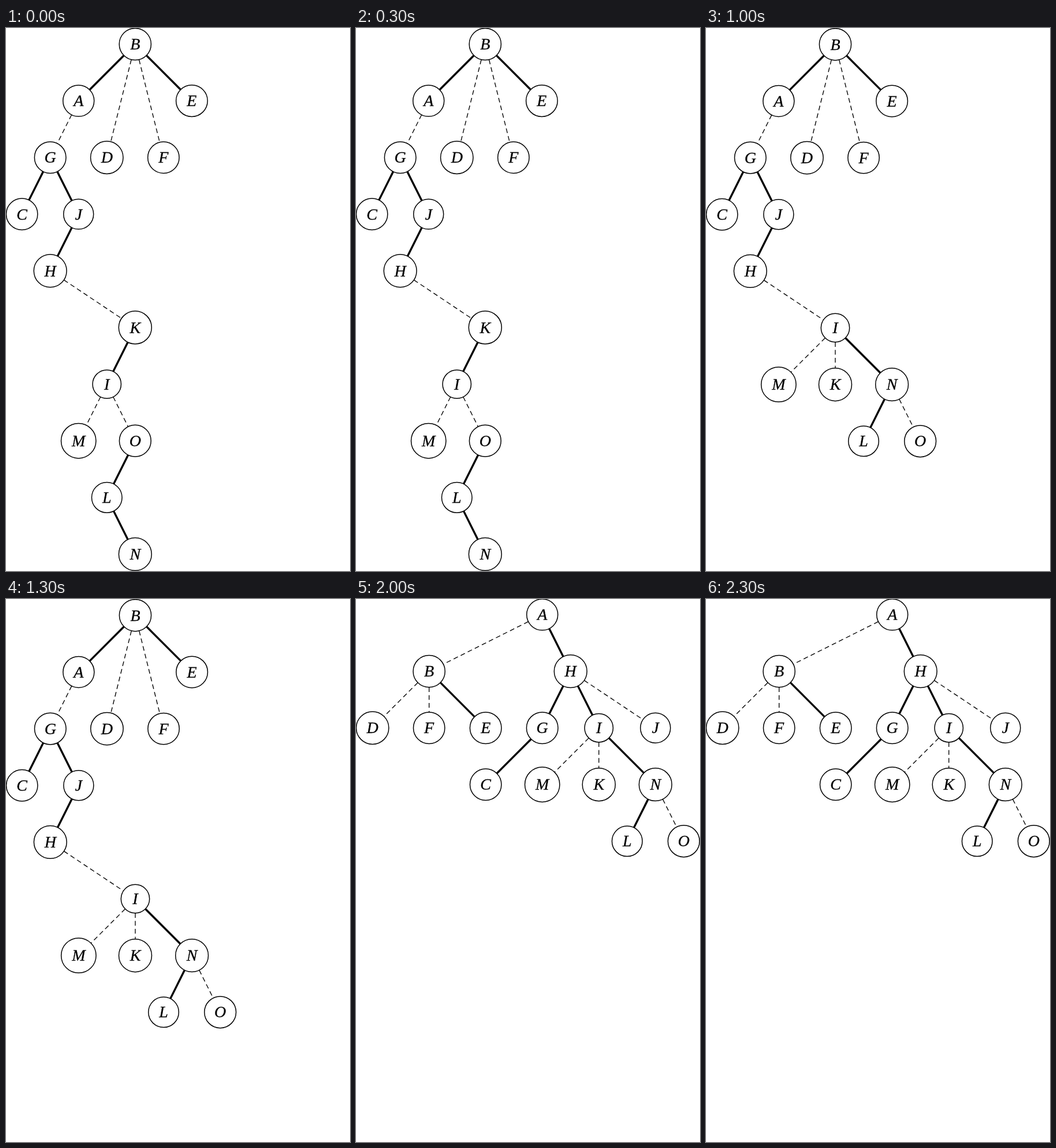
Animation of 596 by 940 pixels, one loop 2.5 s. Source, as an HTML page:

```html
<!DOCTYPE html>
<html lang="en">
<head>
<meta charset="utf-8">
<title>Tree restructuring</title>
<style>
  html, body { margin: 0; width: 100%; height: 100%; overflow: hidden; background: #fff; }
  svg { display: block; width: 596px; height: 940px; }
  .step { opacity: 0; animation: show 2.5s step-end infinite; }
  @keyframes show { 0% { opacity: 1; } 20%, 100% { opacity: 0; } }
  .step { color: #000; }
  .hot { color: #f00; }
  circle { fill: none; stroke: currentColor; stroke-width: 1.5; }
  line { stroke: currentColor; stroke-width: 3.4; }
  .dashed { stroke-width: 1.35; stroke-dasharray: 8.2 5.45; }
  text {
    font: italic 28px "Liberation Serif", "Times New Roman", serif;
    text-anchor: middle;
    fill: currentColor;
    stroke: currentColor;
    stroke-width: .3;
  }
</style>
</head>
<body>
<svg id="stage" viewBox="0 0 596 940"></svg>
<script>
const radius = {
  A: 27, B: 27.6, C: 27.2, D: 28.2, E: 27.3, F: 27.2, G: 27.3, H: 28.4,
  I: 24.7, J: 26, K: 28.5, L: 26.3, M: 30.2, N: 28.4, O: 27.4
};

// Nodes are "letter column,row"; a column is half a row step wide.
const top0 = 'B4,0 A2,1 E6,1 G1,2 D3,2 F5,2 C0,3 J2,3 H1,4 ';
const solid0 = 'BA BE GC GJ JH ';
const dashed0 = 'BD BF AG ';

const steps = [
  { x: 27.6, y: 28, unit: 49.05,
    nodes: top0 + 'K4,5 I3,6 M2,7 O4,7 L3,8 N4,9',
    solid: solid0 + 'KI OL LN', dashed: dashed0 + 'HK IM IO' },
  { x: 27.6, y: 28.3, unit: 49.05,
    nodes: top0 + 'K4,5 I3,6 M2,7 N4,7 L3,8 O5,8',
    solid: solid0 + 'KI NL', dashed: dashed0 + 'HK IM IN NO', hot: 'NLO' },
  { x: 27.7, y: 28.3, unit: 49.07,
    nodes: top0 + 'I4,5 M2,6 K4,6 N6,6 L5,7 O7,7',
    solid: solid0 + 'IN NL', dashed: dashed0 + 'HI IM IK NO' },
  { x: 27.7, y: 28, unit: 49.17,
    nodes: 'B6,0 A4,1 E8,1 H3,2 D5,2 F7,2 G2,3 I4,3 J6,3 C0,4 M2,4 K4,4 N6,4 L5,5 O7,5',
    solid: 'BA BE HG HI GC IN NL', dashed: 'BD BF AH HJ IM IK NO' },
  { x: 28.6, y: 27.1, unit: 49.02,
    nodes: 'A6,0 B2,1 H7,1 D0,2 F2,2 E4,2 G6,2 I8,2 J10,2 C4,3 M6,3 K8,3 N10,3 L9,4 O11,4',
    solid: 'AH BE HG HI GC IN NL', dashed: 'AB BD BF HJ IM IK NO' }
];

function add(parent, tag, attrs, text = '') {
  const el = document.createElementNS('http://www.w3.org/2000/svg', tag);
  for (const key in attrs) el.setAttribute(key, attrs[key]);
  el.textContent = text;
  return parent.appendChild(el);
}

function drawStep({ x, y, unit, nodes, solid, dashed, hot = '' }, index) {
  const group = add(stage, 'g', { class: 'step', style: `animation-delay:${index * 0.5 - 2.5}s` });
  const at = {};

  for (const node of nodes.split(' ')) {
    const id = node[0];
    const [col, row] = node.slice(1).split(',').map(Number);
    const p = at[id] = { x: x + col * unit, y: y + row * unit * 2 };
    const g = add(group, 'g', { class: hot.includes(id) ? 'hot' : '' });
    add(g, 'circle', { cx: p.x, cy: p.y, r: radius[id] });
    add(g, 'text', { x: p.x, y: p.y + 9.2 }, id);
  }

  // Edges run from rim to rim, parent first.
  const link = (pair, kind) => {
    const [a, b] = pair;
    const p = at[a], q = at[b];
    const dx = q.x - p.x, dy = q.y - p.y, length = Math.hypot(dx, dy);
    const s = radius[a] / length, e = radius[b] / length;
    const tint = hot.includes(a) && hot.includes(b) ? ' hot' : '';
    add(group, 'line', {
      class: kind + tint,
      x1: p.x + dx * s, y1: p.y + dy * s,
      x2: q.x - dx * e, y2: q.y - dy * e
    });
  };
  solid.split(' ').forEach(pair => link(pair, 'solid'));
  dashed.split(' ').forEach(pair => link(pair, 'dashed'));
}

const stage = document.getElementById('stage');
steps.forEach(drawStep);
</script>
</body>
</html>
```
